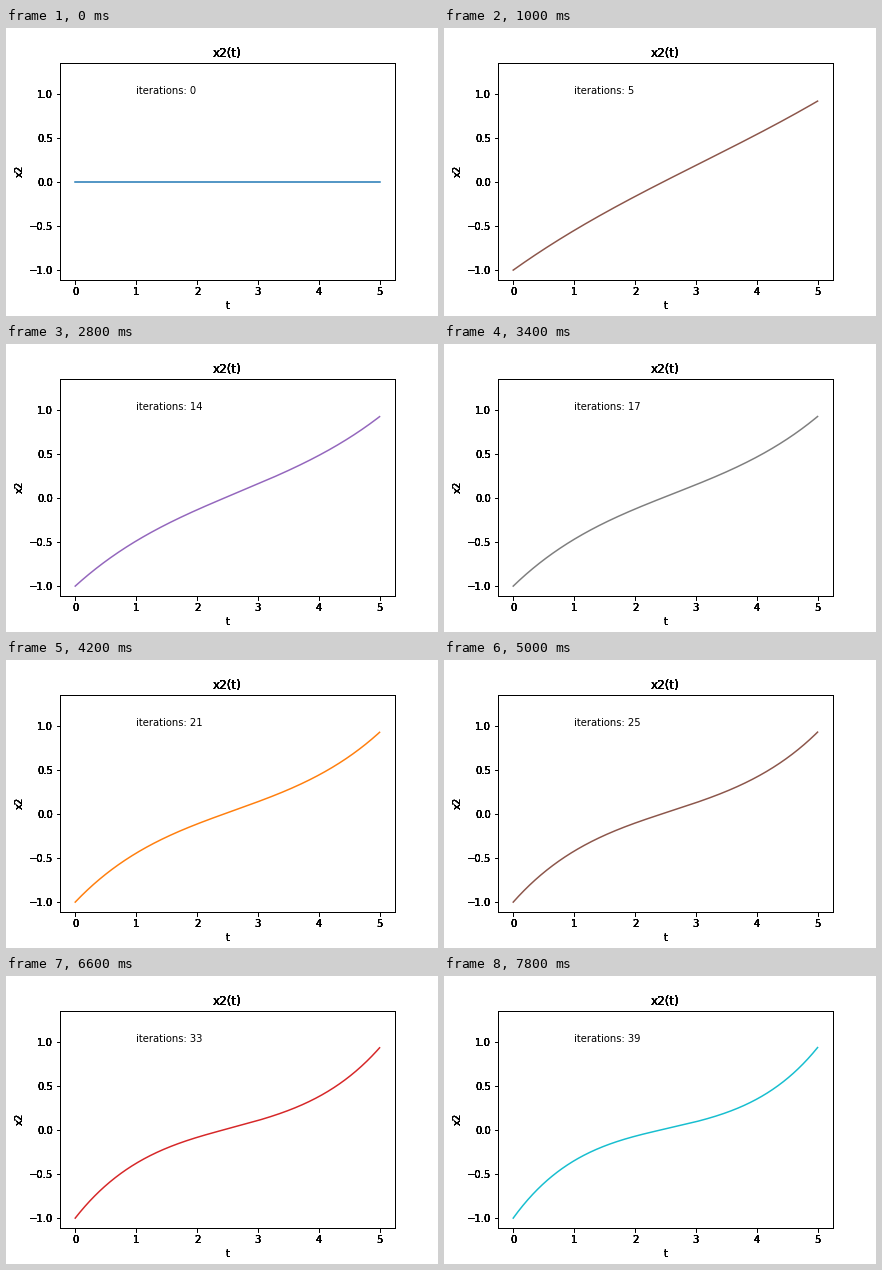
Animation of 432x288 px, one loop 8000 ms. Source, as a matplotlib script:

```python
import numpy as np
import matplotlib.pyplot as plt
from matplotlib.animation import FuncAnimation

STEPS = 40
T_END = 5.0
RUN_GAIN = 0.0195   # step size times running-cost weight
END_GAIN = 0.176    # step size times terminal-cost weight
LAYERS = 6          # stacked axes give the heavy, saturated labels

t = np.linspace(0, T_END, 501)
dt = t[1] - t[0]


def integrate(f):
    """Cumulative trapezoid integral, starting at zero."""
    return np.concatenate([[0], np.cumsum((f[1:] + f[:-1]) * dt / 2)])


def solve():
    """Gradient descent on the control; returns the state per iteration."""
    states = [np.zeros_like(t)]
    u = 0.5 - 0.021 * t
    for _ in range(1, STEPS):
        x = -1 + integrate(u)
        states.append(x)
        area = integrate(x)
        u = u - END_GAIN * (x[-1] - 1) - RUN_GAIN * (area[-1] - area)
    return states


def make_axes(fig):
    ax = fig.add_axes([0.125, 0.125, 0.775, 0.755])
    ax.patch.set_visible(False)
    ax.set_xlim(-0.25, 5.25)
    ax.set_ylim(-1.112, 1.352)
    ax.set_xticks(range(6))
    ax.set_yticks([-1, -0.5, 0, 0.5, 1])
    ax.set_title("x2(t)")
    ax.set_xlabel("t")
    ax.set_ylabel("x2")
    return ax


plt.rcParams["font.family"] = "DejaVu Sans"
fig = plt.figure(figsize=(6, 4), dpi=72, facecolor="white")
ax = [make_axes(fig) for _ in range(LAYERS)][-1]

states = solve()
line, = ax.plot(t, states[0], lw=1.5)
label = ax.text(1, 1, "", fontsize=10)


def update(i):
    line.set_ydata(states[i])
    line.set_color(f"C{i % 10}")
    label.set_text(f"iterations: {i}")
    return line, label


anim = FuncAnimation(fig, update, frames=STEPS, interval=200,
                     repeat=True, repeat_delay=0)
plt.show()
```
